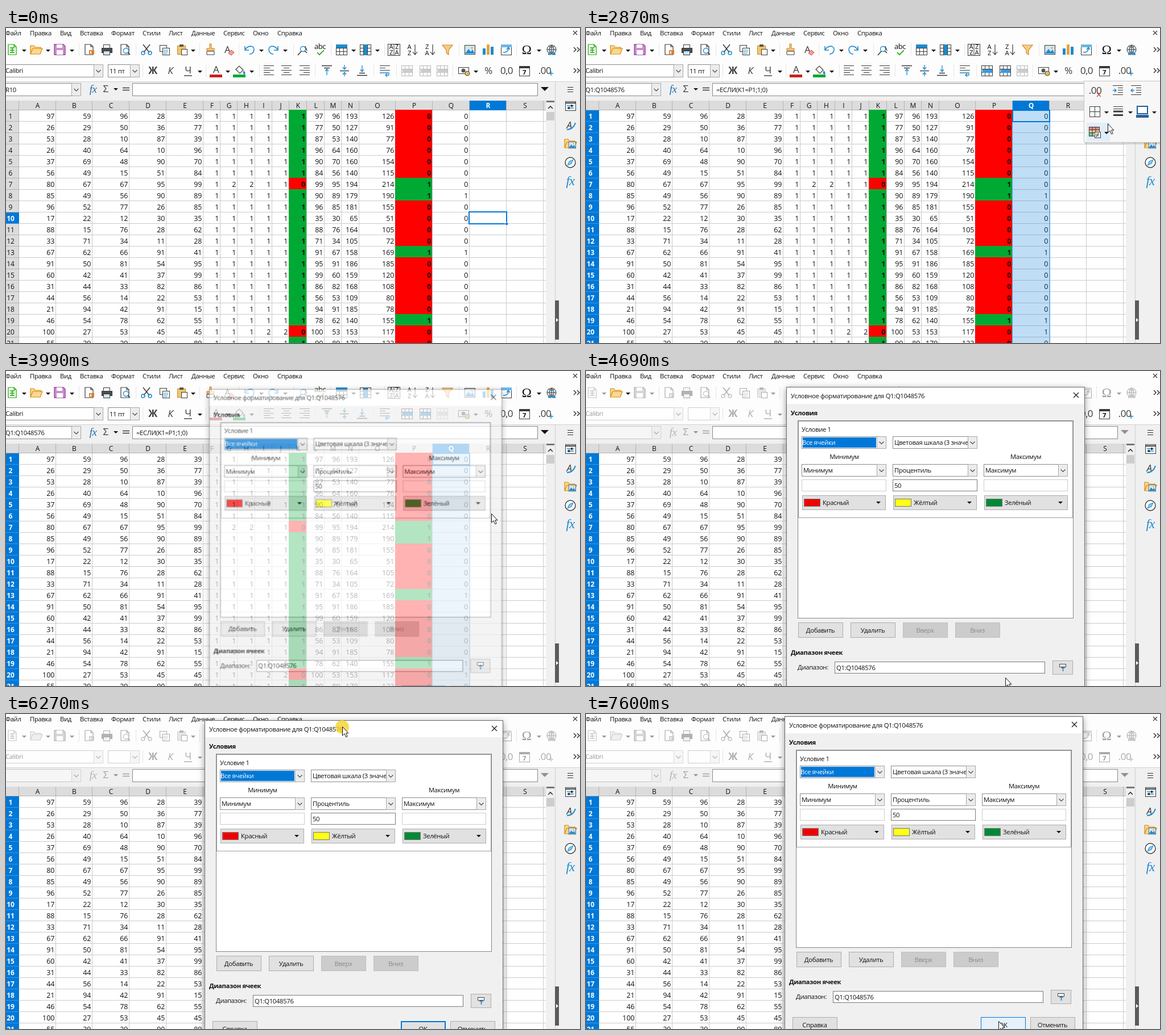
Write an HTML page that moves like this. It is 1009 px wide and 555 px high and loops after 8000 ms.

```html
<!DOCTYPE html>
<html lang="ru">
<head>
<meta charset="utf-8">
<title>Условное форматирование</title>
<style>
html, body { margin: 0; width: 100%; height: 100%; overflow: hidden; background: #fff; }
svg { display: block; width: 1009px; height: 555px; }
text { font: 11.3px "Open Sans", "Noto Sans", sans-serif; letter-spacing: -.03em; fill: #111; white-space: pre; }
.num { font-size: 12.5px; letter-spacing: 0; text-anchor: end; }
.mid { text-anchor: middle; }
.head { font-size: 12px; letter-spacing: 0; text-anchor: middle; }
.on { fill: #fff; font-weight: 700; }
.bold { font-weight: 700; }
.off { fill: #8a8a8a; }
.big { font-size: 17px; text-anchor: middle; fill: #3a3a38; }
.serif { font: italic 19px "Liberation Serif", serif; text-anchor: middle; fill: #1e6fb0; }

/* percent = milliseconds / 80 */
#selCell, #nameCell, #mergeOff { animation: 8s step-end infinite before; }
#selCol, #mergeOn { animation: 8s step-end infinite after; }
#nameCol { animation: 8s step-end infinite between; }
#size { animation: 8s step-end infinite empty; }
.dis { animation: 8s step-end infinite grey; }
.late { animation: 8s step-end infinite greyLate; }
#popup { animation: 8s step-end infinite popup; }
#hover { animation: 8s step-end infinite hover; }
#menu { animation: 8s step-end infinite menu; }
#drag { animation: 8s linear infinite drag; }
#dialog { transform-origin: 614px 308px; animation: 8s linear infinite open; }
#fieldHot { animation: 8s step-end infinite fieldHot; }
#okHot { animation: 8s step-end infinite okHot; }
#pointer { animation: 8s linear infinite move; }
#arrow { animation: 8s step-end infinite seen; }
#press { animation: 8s step-end infinite press; }

@keyframes before { 0% { opacity: 1 } 16.125%, 100% { opacity: 0 } }
@keyframes after { 0% { opacity: 0 } 16.125%, 100% { opacity: 1 } }
@keyframes between { 0% { opacity: 0 } 16.125% { opacity: 1 } 52.5%, 100% { opacity: 0 } }
@keyframes empty { 0% { opacity: 1 } 52.5%, 100% { opacity: 0 } }
@keyframes grey { 0% { filter: none } 52.5%, 100% { filter: grayscale(1) opacity(.42) } }
@keyframes greyLate { 0% { filter: none } 65.375%, 100% { filter: grayscale(1) opacity(.42) } }
@keyframes popup { 0% { opacity: 0 } 27.25% { opacity: 1 } 42.75%, 100% { opacity: 0 } }
@keyframes hover { 0% { opacity: 0 } 35.8%, 100% { opacity: 1 } }
@keyframes menu { 0% { opacity: 0 } 37.625% { opacity: 1 } 41.875%, 100% { opacity: 0 } }
@keyframes open {
  0%, 48.125% { opacity: 0; transform: scale(.94) }
  49.875% { opacity: .7; transform: scale(.981, .986) }
  51.625%, 100% { opacity: 1; transform: none }
}
@keyframes drag {
  0%, 75.75% { transform: translate(0, 0) }
  78.375% { transform: translate(-3px, -17px) }
  82%, 100% { transform: translate(-3px, -24px) }
}
@keyframes fieldHot { 0% { opacity: 0 } 93% { opacity: 1 } 93.75%, 100% { opacity: 0 } }
@keyframes okHot { 0% { opacity: 0 } 94.125%, 100% { opacity: 1 } }
@keyframes seen { 0% { opacity: 0 } .875% { opacity: 1 } 62.875% { opacity: 0 } 65.375%, 100% { opacity: 1 } }
@keyframes press {
  0% { opacity: 0 } 16.125% { opacity: 1 } 17.875% { opacity: 0 }
  26.375% { opacity: 1 } 28.125% { opacity: 0 } 36.75% { opacity: 1 } 37.625% { opacity: 0 }
  41% { opacity: 1 } 41.875% { opacity: 0 } 75.75% { opacity: 1 } 82.5%, 100% { opacity: 0 }
}
@keyframes move {
  0%, .875% { transform: translate(913px, 507px) }
  10.25% { transform: translate(795px, 160px) }
  12.875%, 17.875% { transform: translate(785px, 142px) }
  23% { transform: translate(980px, 82px) }
  25.5% { transform: translate(990px, 67px) }
  26.375%, 31.5% { transform: translate(997px, 76px) }
  35.875% { transform: translate(917px, 168px) }
  36.75%, 38.5% { transform: translate(912px, 184px) }
  41%, 52.5% { transform: translate(853px, 251px) }
  58.625% { transform: translate(737px, 540px) }
  62%, 65.375% { transform: translate(745px, 547px) }
  74.125%, 75.75% { transform: translate(594px, 39px) }
  78.375% { transform: translate(591px, 22px) }
  82%, 84.5% { transform: translate(591px, 15px) }
  94.125%, 100% { transform: translate(725px, 541px) }
}
</style>
</head>
<body>
<svg id="stage" viewBox="0 0 1009 555"></svg>
<script>
const BLUE = '#0078d7', GREEN = '#00a933', RED = '#ff0000', INK = '#3a3a38', SKY = '#1e8bcd';

const fill = (x, y, w, h, c) => `<rect x="${x}" y="${y}" width="${w}" height="${h}" fill="${c}"/>`;
const box = (x, y, w, h, c = '#fff', s = '#8a8a8a') =>
  `<rect x="${x + .5}" y="${y + .5}" width="${w}" height="${h}" fill="${c}" stroke="${s}"/>`;
const frame = (x, y, w, h, c = 'none') =>
  `<rect x="${x}" y="${y}" width="${w}" height="${h}" fill="${c}" stroke="${BLUE}" stroke-width="2"/>`;
const line = (d, s = INK, w = 1, f = 'none') => `<path d="${d}" stroke="${s}" stroke-width="${w}" fill="${f}"/>`;
const text = (x, y, s, c = '') => `<text x="${x}" y="${y}" class="${c}">${s}</text>`;
const group = (s, attrs = '') => `<g ${attrs}>${s}</g>`;
const at = (x, y, s) => group(s, `transform="translate(${x} ${y})"`);
const drop = (x, y) => line(`M${x - 4} ${y - 1}h8l-4 4z`, 'none', 0, '#111');
const chevron = (x, y) => line(`M${x - 4} ${y - 2}l4 4 4-4`, '#444', 1.1);
const each = (list, f) => list.map(f).join('');

/* Sheet: the last twelve columns follow from the first five. */
const edges = [23, 88, 152, 217, 282, 347, 377, 407, 438, 468, 498, 529, 560, 590, 621, 685, 750, 815, 880, 945];
const rows = `97 59 96 28 39/26 29 50 36 77/53 28 10 87 39/26 40 64 10 96/37 69 48 90 70/56 49 15 51 84/80 67 67 95 99
85 49 56 90 89/96 52 77 26 85/17 22 12 30 35/88 15 76 28 62/33 71 34 11 28/67 62 66 91 41/91 50 81 54 95
60 42 41 37 99/31 44 33 82 86/44 56 14 22 53/21 94 42 91 15/46 54 78 62 55/100 27 53 45 45/55 39 29 90 89`
  .split(/[\/\n]/).map(r => r.split(' ').map(Number));

function derive(v) {
  const counts = v.map(a => v.filter(b => a === b).length);
  const unique = +counts.every(c => c === 1);
  const [top, next, ...rest] = [...v].sort((a, b) => b - a);
  const sum = rest.reduce((a, b) => a + b);
  const less = +(sum > top + next);
  return [...v, ...counts, unique, top, next, top + next, sum, less, +(unique === less)];
}

const rowTop = i => 145 + 20 * i;
const colHead = (c, on) => {
  const x = edges[c], w = edges[c + 1] - x;
  return fill(x, 128, w, 17, on ? BLUE : '#dcdcdc') + line(`M${x + w - .5} 128v17`, '#b4b4b4') +
    text(x + w / 2, 141, String.fromCharCode(65 + c), on ? 'head on' : 'head');
};
const rowHead = (i, on) => fill(0, rowTop(i), 23, 20, on ? BLUE : '#dcdcdc') +
  line(`M0 ${rowTop(i) + 19.5}h23`, on ? '#3d97e0' : '#b4b4b4') +
  text(8, rowTop(i) + 14.5, i + 1, on ? 'head on' : 'head');

function sheet() {
  let s = fill(0, 128, 949, 427, '#fff') + fill(0, 128, 949, 17, '#dcdcdc');
  s += each(rows, (_, i) => line(`M23 ${rowTop(i) + 19.5}H949`, '#cbcbcb'));
  s += each(edges, x => line(`M${x - .5} 145V555`, '#cbcbcb'));
  s += each(edges.slice(1), (_, c) => colHead(c)) + each(rows, (_, i) => rowHead(i));
  s += line('M0 144.5H949M22.5 128V555', '#b4b4b4');
  let nums = '';
  rows.forEach((r, i) => derive(r).forEach((v, c) => {
    const flag = c === 10 || c === 15;
    if (flag) s += fill(edges[c] - 1, rowTop(i) - 1, edges[c + 1] - edges[c], 20, v ? GREEN : RED);
    nums += text(edges[c + 1] - 2.5, rowTop(i) + 14.5, v, flag ? 'num bold' : 'num');
  }));
  return s + nums;
}

const selCell = colHead(17, 1) + rowHead(9, 1) + frame(814, 324, 66, 21) + fill(877, 342, 5, 5, '#fff') + fill(878, 343, 4, 4, BLUE);
const selCol = colHead(16, 1) + each(rows, (_, i) => rowHead(i, 1)) +
  fill(750, 145, 65, 410, 'rgba(0,120,215,.25)') + line('M749.5 145V555M815.5 145V555', '#5da8e4') + frame(750, 145, 65, 20);

/* Icons are drawn around their centre. */
const page = (c = INK) => line('M-7-9H3L7-5V9H-7zM3-9v4h4', c, 1.2, '#fff');
const lens = (x, y) => `<circle cx="${x}" cy="${y}" r="4.5" fill="#fff" stroke="${SKY}" stroke-width="1.3"/>` +
  line(`M${x + 3} ${y + 3}l4 4`, INK, 1.6);
const grid = (c = INK) => box(-10, -9, 19, 18, '#fff', c) + line('M-10-2.5H10M-10 3.5H10M-3.5-9V10M3.5-9V10', c);
const lines = (...spans) => line(each(spans, ([x, w], i) => `M${x} ${-8.5 + i * 4}h${w}`), INK, 1.2);
const bars = lines([-9, 18], [-9, 11], [-9, 18], [-9, 11], [-9, 18]);
const merge = c => grid(c) + fill(-8, -2, 17, 6, c === INK ? '#3a9be0' : '#ccc');
const picture = box(-9, -8, 18, 16, '#cfe6f7', INK) + line('M-8 7l6-8 4 5 3-4 4 7z', 'none', 0, SKY) +
  '<circle cx="4" cy="-3" r="2" fill="#f5b942"/>';
const folder = line('M-10 8V-7h6l2 3h10v3M-10 8l4-10H11L7 8z', '#d58a1c', 1.2, '#fbd98c');
const sortMark = (a, b) => text(-5, -1, a, 'mid') + text(-5, 10, b, 'mid') + line('M5-9V8M1 4l4 5 4-5', INK, 1.2);
const ring = x => `<circle cx="${x}" cy="6" r="3" fill="none" stroke="${SKY}" stroke-width="1.5"/>`;
const globe = '<circle r="8" fill="#d8ebf9" stroke="#3a3a38"/>' +
  line('M-8 0H8M0-8V8M-5-6Q0-2 5-6M-5 6Q0 2 5 6M0-8Q-8 0 0 8Q8 0 0-8', INK) + line('M-6 8h5M1 8h6', SKY, 3);
const curve = line('M-8-6v7h7M-8 1C-3-8 8-8 8 0 8 5 4 8 0 8', '#2489cc', 1.6);

const row1 = [
  [11, page('#18a303') + line('M-4-3H4M-4 1H4M-4 5H4M0-3V5', '#18a303', 1.3)],
  [94, line('M-9-9H7l3 3V9H-9z', '#9b3d9c', 1.3, '#c98fca') + fill(-5, -9, 10, 6, '#fff') + fill(-5, 1, 11, 8, '#fff')],
  [146, page() + fill(0, 1, 9, 7, '#e0812c') + line('M3 3v4', '#fff', 2)],
  [177, box(-6, -9, 11, 6, '#fff', INK) + box(-9, -3, 18, 8, '#4d4d4d', INK) + box(-6, 2, 11, 7, '#cde6f8', INK)],
  [209, page() + lens(2, 2)],
  [247, line('M-6-9L5 5M6-9L-5 5', INK, 1.5) + ring(-6) + ring(6)],
  [279, box(-9, -8, 12, 11, '#fff', INK) + box(-4, -3, 12, 12, '#fff', INK) + line('M-2 1h8M-2 4h8M-2 7h6', SKY)],
  [310, box(-9, -7, 14, 15, '#f5c56b', '#c58a2a') + fill(-5, -9, 7, 4, '#555') + box(-2, -1, 10, 10, '#fff', INK)],
  [359, line('M-1-10h3v8h5v4H-6v-4h5z', '#c9802a', 1, '#f8c77c') + line('M-6 3H7V9H-6z', INK, 1, '#fff')],
  [391, text(-2, 6, 'A', 'big') + line('M0 6l5-5 5 4-5 5z', '#d0433b', 1, '#f3a09a')],
  [428, curve],
  [470, group(curve, 'transform="scale(-1 1)"')],
  [522, text(4, 2, 'A', 'mid') + lens(0, -1) + line('M-3 3l-6 7', INK, 1.5)],
  [552, `<text y="-1" class="mid" style="font-size:13px">abc</text>` + line('M-5 5l4 4 8-8', '#18a303', 1.7)],
  [590, grid() + fill(-10, -9, 20, 6, SKY)],
  [632, grid() + fill(-3, -9, 6, 19, SKY)],
  [682, box(-11, -10, 21, 20, '#fff', INK) + line('M0-10V10', INK) + text(-5, -1, 'A', 'mid') + text(5, -1, 'Z', 'mid') + text(-5, 9, 'Z', 'mid') + text(5, 9, 'A', 'mid')],
  [714, sortMark('A', 'Z')],
  [745, sortMark('Z', 'A')],
  [776, line('M-9-8H9L2 1v8l-4-3V1z', '#d08a2a', 1.2, '#f8cb85')],
  [815, picture],
  [847, fill(-9, -2, 5, 11, SKY) + fill(-2, -9, 5, 18, '#e9a23b') + fill(5, -5, 5, 14, SKY)],
  [879, box(-9, -9, 18, 18, '#fff', INK) + fill(-9, -9, 19, 5, '#6fb5e6') + line('M-5 5Q5 5 4-3M1 0l3-4 3 4', SKY, 1.4)],
  [915, `<text y="8" style="font:23px 'Liberation Serif',serif;text-anchor:middle">Ω</text>`],
  [959, globe]
];

const italic = (x, y, s) => `<text x="${x}" y="${y}" class="big" style="font-style:italic">${s}</text>`;
const row2 = [
  [258, text(0, 6, 'Ж', 'big bold')],
  [289, italic(0, 6, 'К')],
  [320, text(0, 5, 'Ч', 'big') + line('M-7 9H7', INK, 1.4)],
  [369, text(0, 4, 'A', 'big') + fill(-11, 7, 22, 5, '#c9211e')],
  [410, line('M-6-2l6-6 7 7-6 6z', INK, 1.2, '#fff') + line('M8 0q5 5 1 7-4-2-1-7', 'none', 0, SKY) + fill(-11, 7, 22, 5, GREEN)],
  [462, bars],
  [493, lines([-9, 18], [-5, 10], [-9, 18], [-5, 10], [-9, 18])],
  [525, group(bars, 'transform="scale(-1 1)"')],
  [564, line('M-9-8.5H9M-5-4.5H5', INK, 1.3) + line('M0 8V-2M-3 1l3-4 3 4', SKY, 1.3)],
  [595, line('M-8 .5H8', INK, 1.4) + line('M0-10v7M-3-6l3 4 3-4M0 10V4M-3 7l3-4 3 4', SKY, 1.3)],
  [626, line('M-9 8.5H9M-5 4.5H5', INK, 1.3) + line('M0-9V1M-3-2l3 4 3-4', SKY, 1.3)],
  [666, lines([-9, 18], [-9, 10], [-9, 18]) + line('M-9 4H7v4H1M4 5L1 8l3 3', SKY, 1.3)],
  [804, box(-9, -6, 18, 11, '#fff', INK) + '<circle r="3.5" fill="#555"/><circle cx="7" cy="5" r="4" fill="#e9bd55" stroke="#444"/>'],
  [848, text(0, 6, '%', 'big')]
];
const lateIcons = at(53, 38, folder) + drop(74, 39) + at(880, 75, text(0, 6, '0,0', 'big')) +
  at(911, 75, box(-9, -8, 18, 17, '#fff', INK) + fill(-9, -8, 19, 4, INK) + text(0, 7, '7', 'mid bold')) +
  at(949, 75, text(-2, 6, '.00', 'big') + line('M5 5h8M9 1v8', SKY, 1.4));

const combo = (x, y, w, h, label) => box(x, y, w, h) + (label ? text(x + 3, y + 15, label) : '') +
  box(x + w - 16, y, 16, h, '#ececec', '#a8a8a8') + chevron(x + w - 7.5, y + h / 2 + 1);

const menuBar = [[-1, 'Файл'], [42, 'Правка'], [95, 'Вид'], [130, 'Вставка'], [185, 'Формат'], [240, 'Стили'],
  [286, 'Лист'], [326, 'Данные'], [382, 'Сервис'], [434, 'Окно'], [477, 'Справка']];

function toolbars() {
  const seps = [[128, 38], [228, 38], [340, 38], [409, 38], [505, 38], [571, 38], [665, 38], [796, 38], [897, 38],
    [240, 75], [351, 75], [445, 75], [543, 75], [646, 75], [686, 75], [785, 75]];
  let s = fill(0, 0, 1009, 94, '#fdfdfd') + fill(0, 94, 1009, 34, '#f0f0f0') + line('M0 94.5H1009', '#d2d2d2');
  s += each(menuBar, ([x, label]) => text(x, 13, label)) + line('M997 5l7 7M1004 5l-7 7', '#333', 1.1);
  s += each(seps, ([x, y]) => line(`M${x + .5} ${y - 11}v22`, '#e6e6e6'));
  const merges = c => each([705, 737], x => at(x, 75, merge(c)));
  let d = each(row1, ([x, icon]) => at(x, 38, icon)) + each(row2, ([x, icon]) => at(x, 75, icon));
  d += each([32, 116, 329, 449, 491, 611, 653, 937], x => drop(x, 39)) + each([341, 390, 432, 826], x => drop(x, 76));
  d += group(merges('#b8b8b8'), 'id="mergeOff"') + group(merges(INK), 'id="mergeOn"') + at(767, 75, merge('#b8b8b8'));
  d += combo(-4, 64, 174, 22, 'Calibri') + combo(179, 64, 55, 22);
  d += combo(-4, 97, 135, 22) + text(153, 114, 'fx', 'serif') + text(175, 113, 'Σ', 'big') +
    drop(193, 107) + line('M205 105.5h12M205 109.5h12', INK, 1.6) + line('M940 104h14l-7 7z', 'none', 0, '#111');
  s += group(d, 'class="dis"') + group(lateIcons, 'class="late"');
  s += group(text(182, 80, '11 пт'), 'id="size"') + box(222, 97, 712, 22);
  s += group(text(-1, 113, 'R10'), 'id="nameCell"');
  s += group(text(-1, 113, 'Q1:Q1048576') + text(229, 113, '=ЕСЛИ(K1=P1;1;0)'), 'id="nameCol"');
  return s + each([38, 75], y => line(`M998 ${y - 4}l4 4-4 4M1004 ${y - 4}l4 4-4 4`, '#222', 1.3));
}

const sideBar = fill(949, 128, 17, 427, '#f0f0f0') + fill(966, 95, 43, 460, '#f0f0f0') + line('M965.5 95V555', '#cfcfcf') +
  fill(950, 128, 14, 3, '#777') + line('M953 142l4-4 4 4', '#333', 1.6) + fill(950, 148, 14, 15, '#cdcdcd') +
  fill(965, 480, 7, 69, '#5b5b5b') + line('M967 511l4 3.5-4 3.5z', 'none', 0, '#fff') +
  line('M987 104.5h10M987 108.5h10M987 112.5h10', '#333', 1.2) +
  at(992, 137, box(-9, -8, 18, 16, '#fff', INK) + line('M-9-5H9', INK, 2) + line('M-6 0H6M-6 4H6', SKY, 1.3) + fill(1, -2, 3, 4, INK) + fill(-4, 2, 3, 4, INK)) +
  at(992, 170, italic(-2, 7, 'A') + line('M-6 9Q5 9 9-3', SKY, 2)) +
  at(992, 203, folder + group(picture, 'transform="translate(3 3) scale(.7)"')) +
  at(992, 237, '<circle r="9" fill="#fff" stroke="#3a3a38" stroke-width="1.4"/>' + line('M5-5L2 2-5 5-2-2z', SKY, 1, '#8cc5ec')) +
  `<text x="992" y="277" class="serif" style="font-size:23px;fill:${SKY}">fx</text>`;

const stripes = line('M-8-8.5H9M-8-4.5H9', INK) + line('M-8 0H9', INK, 3) + line('M-8 6.5H9', INK, 3);
const indent = d => lines([-9, 18], [0, 9], [0, 9], [0, 9], [-9, 18]) + line(d, SKY, 1.4);
const popup = fill(877, 95, 132, 110, 'rgba(0,0,0,.12)') + box(875, 93, 136, 108, '#f7f7f7', '#c4c4c4') +
  group(fill(880, 167, 41, 32, '#e0eefa'), 'id="hover"') +
  at(895, 111, text(0, 5, '.00', 'big') + line('M3 3l7 7M10 3l-7 7', '#d0433b', 1.3)) +
  at(935, 110, indent('M-9 0h6M-6-3l3 3-3 3')) + at(967, 110, indent('M-3 0h-6M-6-3l-3 3 3 3')) +
  at(894, 147, box(-9, -9, 18, 18, '#fff', INK) + line('M-9 .5H9M.5-9V9', INK)) +
  at(935, 147, stripes) + at(978, 147, line('M-9-9H9V4H-9z', '#1e5f9c', 2, '#fff') + fill(-11, 6, 22, 5, '#2a6099')) +
  at(894, 183, box(-10, -9, 18, 16, '#fff', INK) + fill(-9, -8, 17, 4, '#e58a83') + fill(-9, -3, 17, 4, '#f0c98a') + fill(-9, 2, 8, 5, '#7cc48e') +
    line('M-4-9V8M2-9V8M-10-3.5H8M-10 1.5H8', INK) + box(0, 0, 10, 10, '#fff', INK) + line('M2 4h6M2 7h6M7 2l-4 7', INK)) +
  drop(915, 148) + drop(957, 148) + drop(999, 148) + drop(915, 184);

const menu = box(769, 201, 152, 136, '#f2f2f2', '#a6a6a6') + fill(772, 226, 147, 22, '#90c8f6') +
  each(['Условие...', 'Цветовая шкала...', 'Гистограмма...', 'Набор значков...', 'Дата...', 'Управление...'],
    (s, i) => text(800, 219 + i * 22 + (i > 4 ? 3 : 0), s)) + line('M798 314.5H918', '#d0d0d0');

const button = (x, y, w, h, label, off) => box(x, y, w, h, off ? '#cccccc' : '#e1e1e1', off ? '#bfbfbf' : '#adadad') +
  text(x + w / 2, y + h / 2 + 4.5, label, off ? 'mid off' : 'mid');
const colour = (x, c, label) => button(x, 219, 146, 25, '') + box(x + 3, 225, 28, 13, c, '#777') +
  text(x + 36, 236, label) + drop(x + 134, 231);

const dialog = group(box(352, 28, 524, 566, '#f0f0f0', '#6b6b6b'), 'style="filter:drop-shadow(0 3px 6px rgba(0,0,0,.4))"') +
  fill(353, 29, 523, 29, '#fff') + text(360, 47.5, 'Условное форматирование для Q1:Q1048576') +
  line('M857 38l9 9M866 38l-9 9', '#111', 1.1) + text(360, 78, 'Условия', 'bold') +
  box(372, 87, 484, 348, '#fff', '#828790') + box(373, 88, 482, 170, '#fff', '#a0a0a0') + text(379, 106.5, 'Условие 1') +
  combo(379, 115, 148, 21) + fill(381, 117, 129, 18, BLUE) + `<text x="380" y="130" style="fill:#fff">Все ячейки</text>` +
  combo(539, 115, 148, 21, 'Цветовая шкала (3 значе') +
  text(454, 155, 'Минимум', 'mid') + text(773, 155, 'Максимум', 'mid') +
  combo(379, 164, 148, 21, 'Минимум') + combo(539, 164, 148, 21, 'Процентиль') + combo(699, 164, 147, 21, 'Максимум') +
  box(379, 191, 148, 20, '#fff', '#cccccc') + box(539, 191, 148, 20, '#fff', '#7a7a7a') + box(699, 191, 147, 20, '#fff', '#cccccc') +
  text(542, 206, '50') + colour(380, '#f00000', 'Красный') + colour(540, '#ffff14', 'Жёлтый') + colour(700, '#008a35', 'Зелёный') +
  button(373, 443, 78, 26, 'Добавить') + button(465, 443, 78, 26, 'Удалить') +
  button(557, 443, 78, 26, 'Вверх', 1) + button(649, 443, 78, 26, 'Вниз', 1) +
  text(360, 500, 'Диапазон ячеек', 'bold') + text(372, 526, 'Диапазон:') +
  box(437, 512, 369, 20, '#fff', '#7a7a7a') + group(box(437, 512, 369, 20, 'none', '#111'), 'id="fieldHot"') + text(440, 526.5, 'Q1:Q1048576') +
  button(820, 510, 35, 24, '') + box(832, 516, 11, 5, '#fff', '#444') + line('M838.5 529v-8M835.5 524l3-3 3 3', '#1e6fb0', 1.4) +
  button(366, 558, 78, 27, 'Справка') + button(784, 558, 78, 27, 'Отменить') +
  frame(698, 559, 77, 27, '#e1e1e1') + group(box(697, 558, 78, 27, '#e5f1fb', BLUE), 'id="okHot"') + text(736, 576, 'OK', 'mid');

const pointer = '<circle id="press" r="12" cy="1" fill="#f5d327" fill-opacity=".8"/>' +
  group(line('M.5.5V16l3.6-3.3 2.5 6 2.6-1.1-2.5-5.8H11z', '#111', 1, '#fff'), 'id="arrow"');

document.getElementById('stage').innerHTML = toolbars() + sheet() +
  group(selCell, 'id="selCell"') + group(selCol, 'id="selCol"') + sideBar +
  group(popup, 'id="popup"') + group(menu, 'id="menu"') +
  group(group(dialog, 'id="dialog"'), 'id="drag"') + group(pointer, 'id="pointer"');
</script>
</body>
</html>
```
